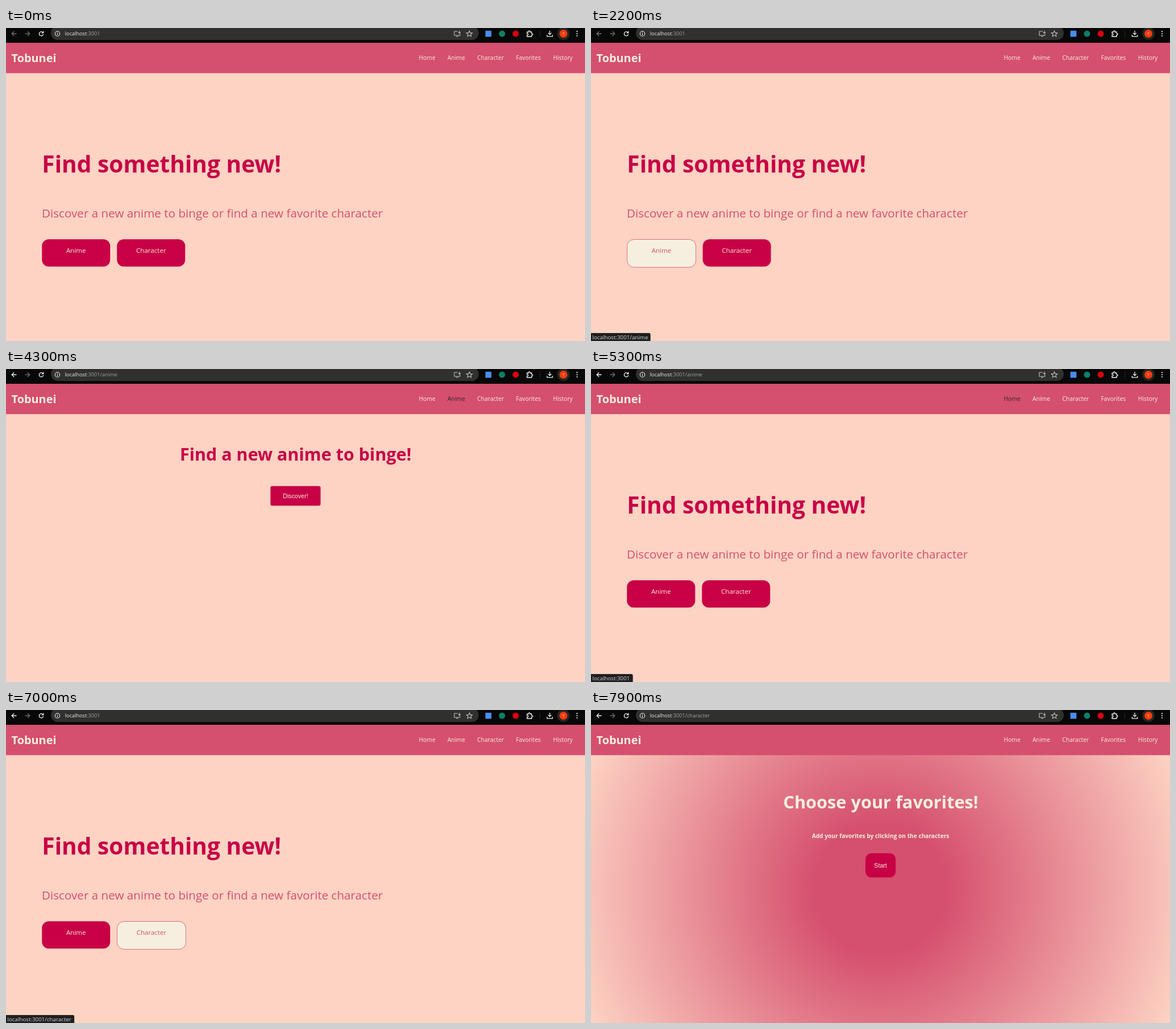
An HTML page for the animation above (8000 ms loop, 1019x550 px).

```html
<!DOCTYPE html>
<html lang="en">
<head>
<meta charset="utf-8">
<title>Find something new</title>
<style>
  :root {
    --pink: #d54f6e;
    --peach: #fdd3c3;
    --crimson: #c80046;
    --cream: #f6efdf;
  }
  html, body { margin: 0; width: 100%; height: 100%; overflow: hidden; background: var(--peach); }
  svg { display: block; width: 100vw; height: 100vh; font-family: "Open Sans", "Noto Sans", sans-serif; }

  .bold { font-weight: 700; }
  .mid { text-anchor: middle; }
  .arial { font: 10.67px "Liberation Sans", Arial, sans-serif; }
  .logo { font-size: 19.9px; }
  .nav { font-size: 10.35px; }
  .url { font-size: 9.17px; }
  .btn { font-size: 11.6px; }
  .tip { font-size: 9.77px; fill: #d6d6d6; }
  .pink { fill: var(--pink); }
  .crimson { fill: var(--crimson); }
  .cream { fill: var(--cream); }
  .line { fill: none; stroke-width: 1.3; }
  .hover { fill: var(--cream); stroke: var(--pink); stroke-width: .8; }

  .anim { animation: 8s step-end infinite; }

  /* pages: 1% of the loop is 80 ms */
  .home { animation-name: home; }
  .anime { animation-name: anime; }
  .character { animation-name: character; }
  @keyframes home { 0%, 66.25% { opacity: 1 } 30%, 92.5% { opacity: 0 } }
  @keyframes anime { 0%, 66.25% { opacity: 0 } 30% { opacity: 1 } }
  @keyframes character { 0% { opacity: 0 } 92.5% { opacity: 1 } }

  /* address bar */
  .back { animation-name: back; }
  .path-a { animation-name: path-a; }
  .path-c { animation-name: path-c; }
  @keyframes back { 0% { stroke: #777 } 30% { stroke: #f2f2f2 } }
  @keyframes path-a { 0%, 67.5% { opacity: 0 } 30% { opacity: 1 } }
  @keyframes path-c { 0% { opacity: 0 } 95% { opacity: 1 } }

  /* pointer over links and buttons */
  .nav-home { animation-name: nav-home; }
  .nav-anime { animation-name: nav-anime; }
  @keyframes nav-home { 0%, 72.5% { fill: var(--cream) } 58.75% { fill: #2b2b2b } }
  @keyframes nav-anime { 0%, 58.75% { fill: var(--cream) } 53.75% { fill: #2b2b2b } }
  .a-off { animation-name: a-off; }
  .a-on { animation-name: a-on; }
  .c-off { animation-name: c-off; }
  .c-on { animation-name: c-on; }
  @keyframes a-off { 0%, 30% { opacity: 1 } 21.25% { opacity: 0 } }
  @keyframes a-on { 0%, 30% { opacity: 0 } 21.25% { opacity: 1 } }
  @keyframes c-off {
    0%, 30% { opacity: 1; transform: none }
    21.25% { opacity: 1; transform: translateX(1.33px) }
    83.75% { opacity: 0; transform: none }
  }
  @keyframes c-on { 0% { opacity: 0 } 83.75% { opacity: 1 } }

  /* status bubble */
  .status { animation-name: status; }
  .tip-a { animation-name: tip-a; }
  .tip-h { animation-name: tip-h; }
  .tip-c { animation-name: tip-c; }
  @keyframes status {
    0% { opacity: 0 }
    25% { opacity: .3 } 26.25% { opacity: .7 } 27.5% { opacity: 1 }
    32.5% { opacity: .7 } 33.75% { opacity: .3 } 35% { opacity: 0 }
    55% { opacity: .5 } 56.25% { opacity: 1 }
    76.25% { opacity: .7 } 77.5% { opacity: .3 } 78.75% { opacity: 0 }
    86.25% { opacity: .5 } 87.5% { opacity: 1 }
    96.25% { opacity: .7 } 97.5% { opacity: .3 } 98.75% { opacity: 0 }
  }
  @keyframes tip-a { 0% { opacity: 1 } 58.75% { opacity: 0 } }
  @keyframes tip-h { 0%, 82% { opacity: 0 } 58.75% { opacity: 1 } }
  @keyframes tip-c { 0% { opacity: 0 } 82% { opacity: 1 } }
</style>
</head>
<body>
<svg viewBox="0 0 1019 550" preserveAspectRatio="none">
  <defs>
    <radialGradient id="glow" gradientUnits="userSpaceOnUse" cx="509.5" cy="314.5" r="561">
      <stop offset=".2" stop-color="#d54f6e"/>
      <stop offset="1" stop-color="#fdd3c3"/>
    </radialGradient>
  </defs>

  <rect width="1019" height="550" fill="#fdd3c3"/>

  <g class="anim home">
    <text class="bold crimson" x="63.3" y="254" font-size="40.7">Find something new!</text>
    <text class="pink" x="63" y="333" font-size="20.65">Discover a new anime to binge or find a new favorite character</text>
    <g class="anim a-off">
      <rect class="crimson" x="63.3" y="371.2" width="120" height="48" rx="12"/>
      <text class="btn mid cream" x="123.3" y="394.5">Anime</text>
    </g>
    <g class="anim a-on">
      <rect class="hover" x="63.6" y="371.5" width="121" height="49" rx="12.3"/>
      <text class="btn mid pink" x="124" y="395.2">Anime</text>
    </g>
    <g class="anim c-off">
      <rect class="crimson" x="195.3" y="371.2" width="120" height="48" rx="12"/>
      <text class="btn mid cream" x="255.3" y="394.5">Character</text>
    </g>
    <g class="anim c-on">
      <rect class="hover" x="195.6" y="371.5" width="121" height="49" rx="12.3"/>
      <text class="btn mid pink" x="256" y="395.2">Character</text>
    </g>
  </g>

  <g class="anim anime">
    <text class="bold mid crimson" x="509.7" y="161" font-size="30.5">Find a new anime to binge!</text>
    <rect class="crimson" x="465.4" y="205.7" width="88.2" height="34.6" rx="3.3"/>
    <text class="arial mid cream" x="509.5" y="226.5">Discover!</text>
  </g>

  <g class="anim character">
    <rect y="79" width="1019" height="471" fill="url(#glow)"/>
    <text class="bold mid cream" x="510" y="173" font-size="30.7">Choose your favorites!</text>
    <text class="bold mid cream" x="509.5" y="225" font-size="10.18">Add your favorites by clicking on the characters</text>
    <rect class="crimson" x="483" y="251.7" width="53.2" height="42.6" rx="10.5"/>
    <text class="arial mid cream" x="509.6" y="276.5">Start</text>
  </g>

  <!-- site header -->
  <rect class="pink" y="25" width="1019" height="54.35"/>
  <text class="logo bold cream" x="9.5" y="60">Tobunei</text>
  <g class="nav cream">
    <text class="anim nav-home" x="726.4" y="56">Home</text>
    <text class="anim nav-anime" x="777" y="56">Anime</text>
    <text x="829.3" y="56">Character</text>
    <text x="897.5" y="56">Favorites</text>
    <text x="962.8" y="56">History</text>
  </g>

  <!-- browser toolbar -->
  <rect width="1019" height="26" fill="#070807"/>
  <rect x="79" y="-3" width="753" height="24" rx="12" fill="#30312f"/>
  <g class="line" stroke="#f2f2f2">
    <path class="anim back" d="M18.5 10H10.3M14.2 6l-4 4 4 4"/>
    <path stroke="#6c6c6c" d="M33.5 10h8.2M37.8 6l4 4-4 4"/>
    <path d="M65 7.9A3.7 3.7 0 1 0 65.7 10.8M65.8 5.6v3h-3"/>
    <circle cx="90.5" cy="10" r="4.2" stroke-width="1.1"/>
    <path stroke-width="1.2" d="M90.5 9.5v2.8M90.5 7.4v1.2"/>
    <g stroke="#c4c4c2" stroke-width="1.1">
      <path d="M795 6h-6v7h10v-2.4M792 14.8h4M798 4.8v4.4M796 7.4l2 2 2-2"/>
      <path d="M815.5 5l1.5 3.4 3.7.3-2.8 2.4.9 3.6-3.3-1.9-3.3 1.9.9-3.6-2.8-2.4 3.7-.3z"/>
    </g>
    <path d="M917 7h2.6a1.5 1.5 0 1 1 2.8 0h2.6v2.6a1.5 1.5 0 1 1 0 2.8v2.6h-8v-2.6a1.5 1.5 0 1 0 0-2.8z"/>
    <path stroke="#2a2a2a" stroke-width="1" d="M939.5 5v11"/>
    <path d="M957 4.8v6.4M954 8.6l3 3 3-3M952.3 12v2.8h9.4V12"/>
  </g>
  <rect x="843.7" y="4.8" width="10.6" height="10.6" fill="#4a8df0"/>
  <circle cx="873" cy="10" r="5.5" fill="#0c8067"/>
  <circle cx="897" cy="10" r="5.5" fill="#d9000d"/>
  <circle cx="981" cy="10" r="11" fill="#252625"/>
  <circle cx="981" cy="10" r="7" fill="#f33b0b"/>
  <text class="mid" x="981" y="12.7" font-size="7.5" fill="#fbd9cf">T</text>
  <g fill="#f2f2f2">
    <circle cx="1005" cy="6.2" r="1.1"/>
    <circle cx="1005" cy="10" r="1.1"/>
    <circle cx="1005" cy="13.8" r="1.1"/>
  </g>
  <g class="url" fill="#a0a09e">
    <text x="103.8" y="13.2"><tspan fill="#ececea">localhost</tspan>:3001</text>
    <text class="anim path-a" x="165.6" y="13.2">/anime</text>
    <text class="anim path-c" x="165.6" y="13.2">/character</text>
  </g>

  <g class="anim status">
    <g class="anim tip-a">
      <path fill="#1f201f" d="M0 536h102a2.7 2.7 0 0 1 2.7 2.7V550H0z"/>
      <text class="tip" x="2.5" y="546.5">localhost:3001/anime</text>
    </g>
    <g class="anim tip-h">
      <path fill="#1f201f" d="M0 536h71a2.7 2.7 0 0 1 2.7 2.7V550H0z"/>
      <text class="tip" x="2.5" y="546.5">localhost:3001</text>
    </g>
    <g class="anim tip-c">
      <path fill="#1f201f" d="M0 536h117.5a2.7 2.7 0 0 1 2.7 2.7V550H0z"/>
      <text class="tip" x="2.5" y="546.5">localhost:3001/character</text>
    </g>
  </g>
</svg>
</body>
</html>
```
